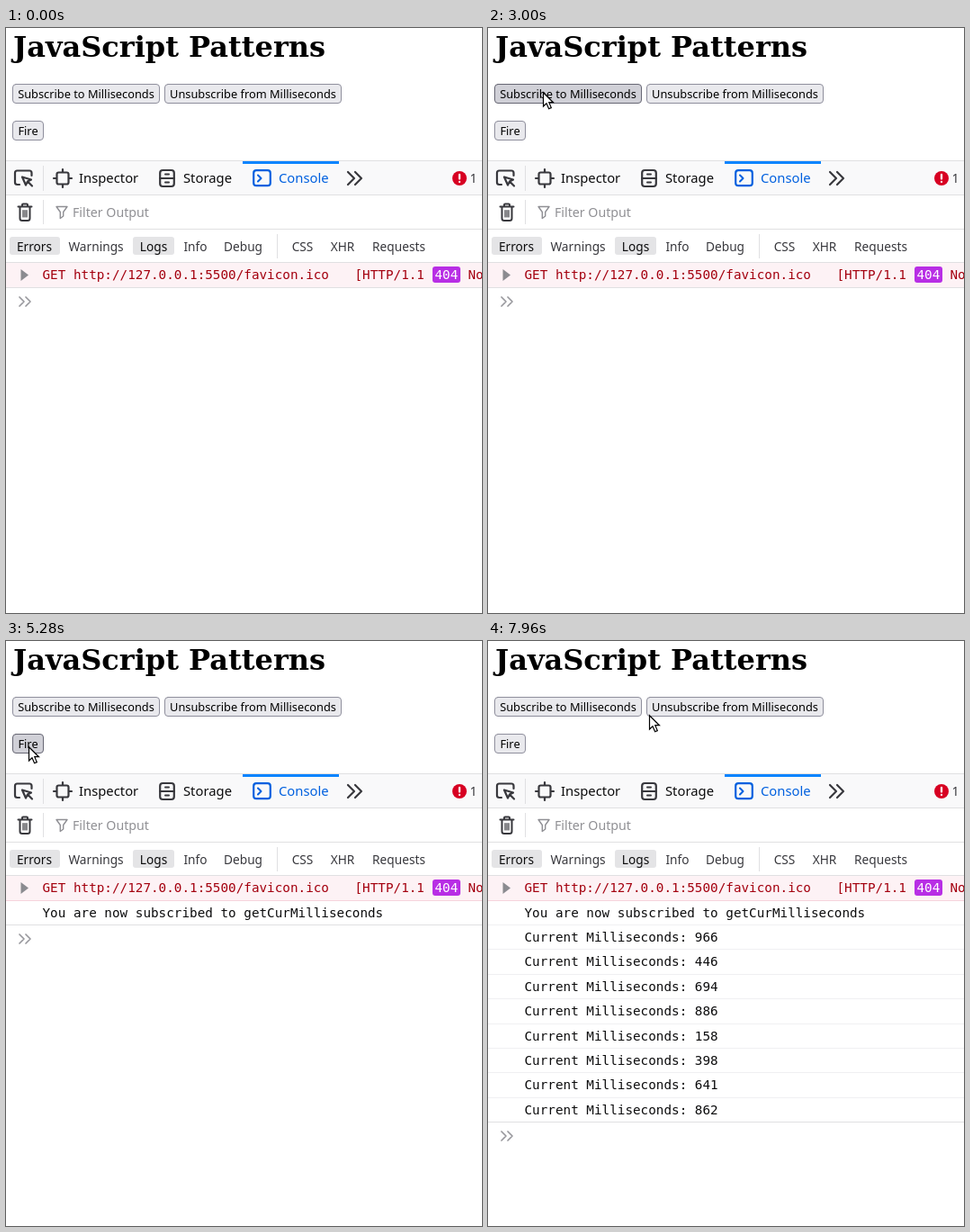
Animation, 529 px wide and 650 px high, one loop 8 s. Source, as an HTML page with a canvas:

```html
<!DOCTYPE html>
<html lang="en">
<head>
<meta charset="utf-8">
<title>JavaScript Patterns</title>
<style>
  html, body { margin: 0; width: 100%; height: 100%; overflow: hidden; background: #fff; }
  canvas { display: block; }
</style>
</head>
<body>
<canvas id="stage" width="529" height="650"></canvas>
<script>
const ctx = document.getElementById('stage').getContext('2d');
const LOOP = 8000, TICK = 40, ROW = 27.4;
const SANS = '"Noto Sans", sans-serif';
const MONO = '14.3px "DejaVu Sans Mono", monospace';
const INK = '#38383d', LINE = '#e0e0e2', ERROR = '#a4000f';

const buttons = [
  { label: 'Subscribe to Milliseconds', x: 7, y: 62, w: 164 },
  { label: 'Unsubscribe from Milliseconds', x: 176, y: 62, w: 197 },
  { label: 'Fire', x: 7, y: 103, w: 35 }
];

const cursorKeys = [
  [720, -8, 92], [880, 15, 107], [1000, 27, 104], [1160, 27, 104], [1200, 27, 105],
  [2400, 27, 105], [3000, 61, 71], [3960, 61, 71], [4440, 39, 106], [4680, 35, 111],
  [4800, 35, 111], [5000, 25, 117], [7320, 25, 117], [7960, 179, 82]
];

// Mouse-down intervals
const presses = [
  [1480, 1520], [1720, 1800], [1960, 2040], [2200, 2280], [3600, 3680], [5200, 5280],
  [5680, 5760], [5920, 6000], [6160, 6200], [6640, 6720], [6880, 6960], [7120, 7200]
];

const current = n => 'Current Milliseconds: ' + n;
const logs = [
  [3760, 'You are now subscribed to getCurMilliseconds'],
  [5360, current(966)], [5840, current(446)], [6080, current(694)], [6280, current(886)],
  [6560, current(158)], [6800, current(398)], [7040, current(641)], [7240, current(862)]
];

function rect(x, y, w, h, color) {
  ctx.fillStyle = color;
  ctx.fillRect(x, y, w, h);
}

function roundBox(x, y, w, h, r, fill, stroke, width = 1) {
  ctx.beginPath();
  ctx.roundRect(x, y, w, h, r);
  if (fill) { ctx.fillStyle = fill; ctx.fill(); }
  if (stroke) { ctx.strokeStyle = stroke; ctx.lineWidth = width; ctx.stroke(); }
}

function text(str, x, y, font, color, align = 'left') {
  ctx.font = font;
  ctx.fillStyle = color;
  ctx.textAlign = align;
  ctx.fillText(str, x, y);
}

// Strokes an SVG path string
function draw(d, color = INK, width = 2.2) {
  ctx.strokeStyle = color;
  ctx.lineWidth = width;
  ctx.lineCap = ctx.lineJoin = 'round';
  ctx.stroke(new Path2D(d));
}

function cursorAt(t) {
  if (t < cursorKeys[0][0]) return null;
  const next = cursorKeys.findIndex(k => k[0] > t);
  if (next < 0) return cursorKeys.at(-1).slice(1);
  const [t0, x0, y0] = cursorKeys[next - 1], [t1, x1, y1] = cursorKeys[next];
  const p = (t - t0) / (t1 - t0), e = p * p * (3 - 2 * p);
  return [Math.round(x0 + (x1 - x0) * e), Math.round(y0 + (y1 - y0) * e)];
}

function drawPage(cursor, pressed) {
  text('JavaScript Patterns', 8, 32, 'bold 32px "DejaVu Serif", serif', '#000');
  for (const { label, x, y, w } of buttons) {
    const hover = cursor && cursor[0] >= x && cursor[0] < x + w && cursor[1] >= y && cursor[1] < y + 20;
    const fill = !hover ? '#e9e9ed' : pressed ? '#b1b1b9' : '#d0d0d7';
    const edge = !hover ? '#8f8f9d' : pressed ? '#484851' : '#676774';
    roundBox(x + .5, y + .5, w - 1, 21, 3.5, fill, edge);
    text(label, x + w / 2, y + 16, '12.8px ' + SANS, '#000', 'center');
  }
}

function drawTabs() {
  const font = '14.8px ' + SANS;
  rect(0, 147, 529, 39, '#f9f9fa');
  rect(0, 147, 529, 1, LINE);
  rect(0, 185, 529, 1, LINE);
  rect(41, 153, 1, 28, LINE);
  rect(263, 148, 107, 3, '#0a84ff');

  // Element picker
  draw('M15 174H12.5Q10 174 10 171.500V161Q10 158.500 12.500 158.500H26Q28.500 158.500 28.500 161V164');
  draw('M18 165.500L28 168.500L24 170.500L22 174.500ZM24 170.500L29 175.500');
  // Inspector
  roundBox(56.5, 160.5, 13, 13, 2, null, INK, 2.2);
  draw('M63 157V160M63 174V177M53 167H56M70 167H73');
  text('Inspector', 81, 172, font, '#0c0c0d');
  // Storage
  roundBox(171.2, 158, 15.6, 18, 3, null, INK, 2.2);
  draw('M171 167H187M177 162.500H181M177 171.500H181', INK, 2);
  text('Storage', 197, 172, font, '#0c0c0d');
  // Console
  roundBox(275.2, 158.2, 18.6, 17, 3, null, '#0060df', 2.2);
  draw('M280 163.500L283.500 167L280 170.500', '#0060df', 2);
  text('Console', 303, 172, font, '#0060df');

  draw('M380 160L387 167L380 174M388 160L395 167L388 174', INK, 2.2);
  ctx.beginPath();
  ctx.arc(504, 167, 8, 0, Math.PI * 2);
  ctx.fillStyle = '#d70022';
  ctx.fill();
  draw('M504 163V167.500M504 171V171.100', '#fff', 2.3);
  text('1', 515.5, 172, '14px ' + SANS, INK);
}

function drawFilters() {
  rect(0, 223, 529, 1, LINE);
  rect(41, 191, 1, 27, LINE);
  draw('M13.500 198.500H28.500M18 198V196.500Q18 195.500 19 195.500H23Q24 195.500 24 196.500V198' +
       'M15.500 199V211.500Q15.500 214 18 214H24Q26.500 214 26.500 211.500V199', INK, 2);
  draw('M19 202.500V210M21 202.500V210M23 202.500V210', INK, 1.2);
  draw('M56 198.500H68L63.700 204.500V209L60.300 211.500V204.500Z', '#8f8f94', 1.4);
  text('Filter Output', 74, 210, '14.2px ' + SANS, '#909094');

  roundBox(4, 232, 56, 20, 3, '#e4e4e6');
  roundBox(141, 232, 46, 20, 3, '#e4e4e6');
  rect(301, 229, 1, 27, LINE);
  const labels = { Errors: 31.5, Warnings: 100, Logs: 164, Info: 210.5, Debug: 263.5, CSS: 329.5, XHR: 374, Requests: 436.5 };
  for (const [name, x] of Object.entries(labels)) {
    const on = name === 'Errors' || name === 'Logs';
    text(name, x, 248, '13.7px ' + SANS, on ? '#0c0c0d' : INK, 'center');
  }
}

function drawConsole(t) {
  const shown = logs.filter(([at]) => at <= t);
  rect(0, 260, 529, 29, '#fdf2f5');
  rect(0, 260, 529, 1, LINE);
  rect(0, 288, 529, 1, shown.length ? '#f6d4dc' : LINE);
  ctx.fillStyle = '#8b8b90';
  ctx.fill(new Path2D('M16.500 268V281L25 274.500Z'));
  text('GET http://127.0.0.1:5500/favicon.ico', 40.5, 279, MONO, ERROR);
  text('[HTTP/1.1', 387.5, 279, MONO, ERROR);
  roundBox(474, 265, 31, 18, 3, '#b82ee5');
  text('404', 476.5, 279, MONO, '#fff');
  text('Not Found]', 513.5, 279, MONO, ERROR);

  shown.forEach(([, message], i) => {
    text(message, 40.5, Math.floor(307 + ROW * i), MONO, '#0c0c0d');
    rect(0, Math.floor(288 + ROW * (i + 1)), 529, 1, i === shown.length - 1 ? LINE : '#f0f0f2');
  });

  const y = Math.floor(304 + ROW * shown.length);
  draw(`M15 ${y - 5}l5 5l-5 5M22 ${y - 5}l5 5l-5 5`, '#98989d', 1.7);
}

function drawCursor([x, y]) {
  const arrow = new Path2D('M.5 .8V16L4 12.700L6.600 18.800L9.300 17.600L6.800 11.700H11.500Z');
  ctx.save();
  ctx.translate(x, y);
  ctx.fillStyle = '#fff';
  ctx.fill(arrow);
  ctx.strokeStyle = '#000';
  ctx.lineWidth = 1.2;
  ctx.lineJoin = 'miter';
  ctx.stroke(arrow);
  ctx.restore();
}

function render(now) {
  const t = Math.floor(now % LOOP / TICK) * TICK;
  const cursor = cursorAt(t);
  const pressed = presses.some(([down, up]) => t >= down && t < up);
  rect(0, 0, 529, 650, '#fff');
  drawPage(cursor, pressed);
  drawTabs();
  drawFilters();
  drawConsole(t);
  if (cursor) drawCursor(cursor);
}

const start = performance.now();
function frame() {
  render(performance.now() - start);
  requestAnimationFrame(frame);
}
frame();
</script>
</body>
</html>
```
